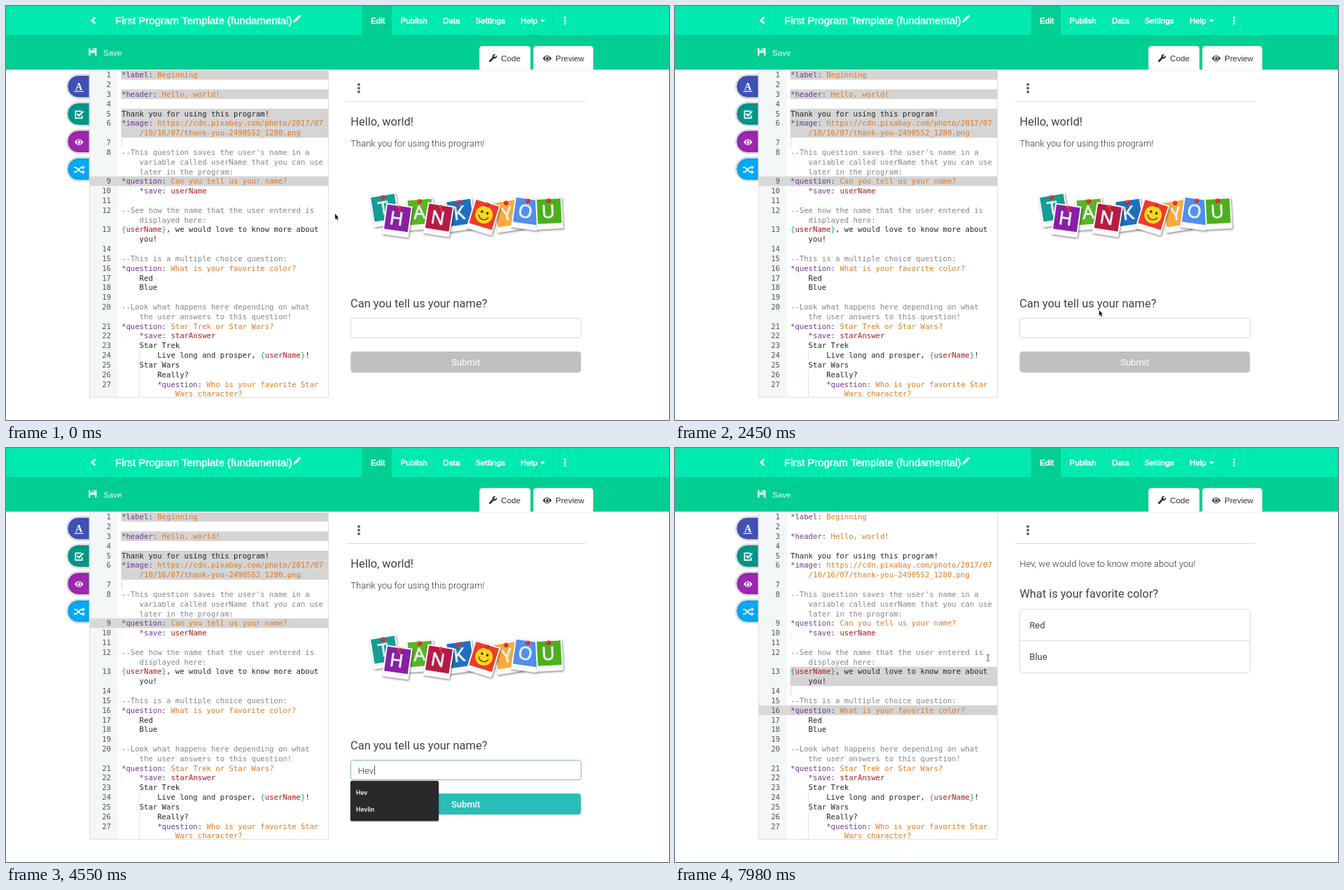
Animation of 947x592 px, one loop 8000 ms. Source, as an HTML page with a canvas:

```html
<!DOCTYPE html>
<html lang="en">
<head>
<meta charset="utf-8">
<title>Program editor</title>
<style>
html, body { margin: 0; width: 100%; height: 100%; overflow: hidden; background: #fff; }
canvas { display: block; }
</style>
</head>
<body>
<canvas id="stage" width="947" height="592"></canvas>
<script>
const ctx = document.getElementById('stage').getContext('2d');
const LOOP = 8000;
const SANS = '"Liberation Sans", Arial, sans-serif';
const ROBOTO = 'Roboto, sans-serif';
const MONO = '10.63px "DejaVu Sans Mono", monospace';
const CHAR = 6.4, ROW = 13.82, TOP = 91.6;
const USER = 'Hev', USER_LONG = 'Hevlin';

// Moments of the story in ms
const CLICK = [3060, 3300], FOCUS = 3200, KEYS = [3780, 3990, 4200];
const SENT = 5250, LOADED = 5670, BACK = 6250;
const PATH = [[0, 470, 297], [1330, 470, 297], [1610, 513, 305], [2000, 575, 362],
  [2600, 616, 459], [BACK, 616, 459], [6790, 522, 408], [7450, 447, 300], [LOOP, 447, 300]];

// Line number (0 for a wrapped row), indent, text
const CODE = [
  [1, 0, '*label: Beginning'], [2, 0, ''], [3, 0, '*header: Hello, world!'], [4, 0, ''],
  [5, 0, 'Thank you for using this program!'],
  [6, 0, '*image: https://cdn.pixabay.com/photo/2017/07'],
  [0, 4, '/10/16/07/thank-you-2490552_1280.png'], [7, 0, ''],
  [8, 0, "--This question saves the user's name in a"],
  [0, 4, 'variable called userName that you can use'], [0, 4, 'later in the program:'],
  [9, 0, '*question: Can you tell us your name?'], [10, 4, '*save: userName'], [11, 0, ''],
  [12, 0, '--See how the name that the user entered is'], [0, 4, 'displayed here:'],
  [13, 0, '{userName}, we would love to know more about'], [0, 4, 'you!'], [14, 0, ''],
  [15, 0, '--This is a multiple choice question:'],
  [16, 0, '*question: What is your favorite color?'], [17, 4, 'Red'], [18, 4, 'Blue'], [19, 0, ''],
  [20, 0, '--Look what happens here depending on what'],
  [0, 4, 'the user answers to this question!'],
  [21, 0, '*question: Star Trek or Star Wars?'], [22, 4, '*save: starAnswer'],
  [23, 4, 'Star Trek'], [24, 8, 'Live long and prosper, {userName}!'],
  [25, 4, 'Star Wars'], [26, 8, 'Really?'],
  [27, 8, '*question: Who is your favorite Star'], [0, 12, 'Wars character?']
];
const INK = { plain: '#262626', note: '#858585', key: '#6c3a8e', value: '#e07a1f', name: '#ad1a1a', brace: '#259a85' };

// Letter, centre, tilt in degrees, colour; listed from back to front
const CARDS = [
  ['T', 541, 291, -9, '#159c95'], ['A', 592, 297, -4, '#58b524'], ['K', 649, 298, -8, '#1f6fc0'],
  ['Y', 717, 299, -9, '#fbab3c'], ['O', 743, 296, 8, '#4f8ff0'], ['H', 559, 306, 8, '#8a1fa6'],
  ['N', 618, 305, 9, '#b81a46'], ['', 682, 301, 17, '#ee3b2e'], ['U', 776, 296, -3, '#4bb01c']
];

function rect(x, y, w, h, fill) { ctx.fillStyle = fill; ctx.fillRect(x, y, w, h); }

function box(x, y, w, h, r, fill, edge) {
  ctx.beginPath();
  ctx.roundRect(x, y, w, h, r);
  if (fill) { ctx.fillStyle = fill; ctx.fill(); }
  if (edge) { ctx.strokeStyle = edge; ctx.lineWidth = 1; ctx.stroke(); }
}

function disc(x, y, r, fill) {
  ctx.beginPath();
  ctx.arc(x, y, r, 0, 7);
  ctx.fillStyle = fill;
  ctx.fill();
}

function line(points, color, width) {
  ctx.beginPath();
  for (const [x, y] of points) ctx.lineTo(x, y);
  ctx.strokeStyle = color;
  ctx.lineWidth = width;
  ctx.stroke();
}

function shape(points, fill) {
  ctx.beginPath();
  for (const [x, y] of points) ctx.lineTo(x, y);
  ctx.closePath();
  ctx.fillStyle = fill;
  ctx.fill();
}

function text(s, x, y, font, fill, bolder = 0, align = 'left') {
  ctx.font = font;
  ctx.textAlign = align;
  ctx.fillStyle = fill;
  ctx.fillText(s, x, y);
  if (bolder) {
    ctx.strokeStyle = fill;
    ctx.lineWidth = bolder;
    ctx.strokeText(s, x, y);
  }
}

function at(x, y, degrees, draw) {
  ctx.save();
  ctx.translate(x, y);
  ctx.rotate(degrees * Math.PI / 180);
  draw();
  ctx.restore();
}

function dots(x, y, gap, r, fill) {
  for (const k of [-1, 0, 1]) disc(x, y + k * gap, r, fill);
}

function eye(x, y, fill, back) {
  ctx.beginPath();
  ctx.moveTo(x - 6.3, y);
  ctx.quadraticCurveTo(x, y - 8.4, x + 6.3, y);
  ctx.quadraticCurveTo(x, y + 8.4, x - 6.3, y);
  ctx.fillStyle = fill;
  ctx.fill();
  disc(x, y, 3.2, back);
  disc(x, y, 2.2, fill);
  disc(x - 0.8, y - 0.9, 0.8, back);
}

function drawHeader() {
  rect(0, 0, 947, 42, '#00eaaf');
  rect(0, 41.5, 947, 49.5, '#00ce92');
  rect(508.5, 0, 42.5, 42, '#00ce92');
  rect(143, 0, 1, 41, '#00dda3');
  rect(780, 0, 1, 41, '#00dda3');
  line([[127.3, 16.3], [122.6, 20.5], [127.3, 24.7]], '#fff', 2.5);
  text('First Program Template (fundamental)', 156, 26, '15px ' + SANS, '#fff', 0.5);
  at(415, 19, 45, () => {
    rect(-1.7, -5, 3.4, 8, '#fff');
    rect(-1.7, -7.3, 3.4, 1.6, '#fff');
    shape([[-1.7, 3.6], [1.7, 3.6], [0, 7]], '#fff');
  });
  const nav = { Edit: 521, Publish: 563.5, Data: 624, Settings: 670.5, Help: 735 };
  for (const label in nav) text(label, nav[label], 25, '11.7px ' + SANS, '#fff', 0.5);
  shape([[763, 19.5], [770, 19.5], [766.5, 23.2]], '#fff');
  dots(798.5, 20.8, 4.3, 1.6, '#fff');

  const pale = '#d4f7ea';
  box(118, 60, 11.5, 11, 1, pale);
  rect(120.5, 60, 5.5, 3.4, '#00ce92');
  rect(123.5, 60.3, 1.6, 2.4, pale);
  rect(120.5, 67.2, 6.5, 3.8, '#00ce92');
  text('Save', 139, 71, '11.6px ' + SANS, pale, 0.15);

  box(676.5, 57.5, 72.5, 34.5, [4, 4, 0, 0], '#fff', '#d5e6df');
  box(753.5, 57.5, 85, 34.5, [4, 4, 0, 0], '#fff', '#d5e6df');
  rect(677, 90, 161, 2, '#fff');
  rect(749.5, 58, 3.5, 33, '#00ce92');
  at(695.5, 74.5, 45, () => {
    box(-1.4, -2, 2.8, 9.3, 1.4, '#333');
    disc(0, -3.4, 3.2, '#333');
    rect(-1.1, -7, 2.2, 4, '#fff');
  });
  text('Code', 707, 79, '11.7px ' + SANS, '#333');
  eye(773, 75, '#333', '#fff');
  text('Preview', 785, 79, '11.5px ' + SANS, '#333');
}

function drawSideButtons() {
  ['#3f51b5', '#009688', '#9c27b0', '#03a9f4'].forEach((color, i) => {
    const y = 99.3 + i * 39.4;
    ctx.save();
    ctx.shadowColor = 'rgba(0,0,0,.35)';
    ctx.shadowBlur = 3;
    box(87.8, y, 31.2, 31.6, [15.8, 0, 0, 15.8], color, '#e4e6ea');
    ctx.restore();
  });
  const w = '#fff';
  text('A', 104, 120, 'bold 14px "Liberation Serif", serif', w, 0, 'center');
  rect(97.5, 121.5, 13, 1.2, w);

  line([[107.5, 150.3], [99.3, 150.3], [99.3, 160.3], [108.7, 160.3], [108.7, 156.5]], w, 1.7);
  line([[101.5, 154], [104.2, 156.8], [110.3, 150.5]], w, 2.2);

  eye(104.2, 194.7, w, '#9c27b0');

  line([[97, 230.8], [100, 230.8], [107, 237.4], [110, 237.4]], w, 1.7);
  line([[97, 237.4], [100, 237.4], [107, 230.8], [110, 230.8]], w, 1.7);
  for (const y of [230.8, 237.4]) shape([[109.3, y - 2.8], [113, y], [109.3, y + 2.8]], w);
}

function codeParts(s, last) {
  if (s.startsWith('--')) return [['note', s]];
  const command = s.match(/^(\*\w+:)(.*)/);
  if (command) return [['key', command[1]], [command[1] === '*save:' ? 'name' : 'value', command[2]]];
  if (last !== 'plain') return [[last, s]];
  return s.split(/([{}])/).map((part, i, all) => {
    if (part === '{' || part === '}') return ['brace', part];
    return [all[i - 1] === '{' ? 'name' : 'plain', part];
  });
}

function drawEditor(sent) {
  const marked = sent ? [13, 16] : [1, 3, 5, 6, 9];
  const active = sent ? 16 : 9;
  ctx.save();
  ctx.beginPath();
  ctx.rect(119, 92, 342, 468);
  ctx.clip();
  rect(119, 92, 342, 468, '#fff');
  rect(120, 92, 40, 467, '#f4f7f7');
  let num = 0, style = 'plain';
  CODE.forEach(([n, indent, s], i) => {
    const y = TOP + i * ROW, base = y + 10.7;
    if (n) { num = n; style = 'plain'; }
    if (marked.includes(num)) rect(164.5, y, 296, ROW, '#d4d4d4');
    if (num === active) rect(120, y, 45, ROW, '#d8d9d9');
    if (n === (sent ? 14 : 7)) rect(165, y, 1, ROW, '#dedede');
    if (n === 10 || n === 22) rect(165, y, 1, ROW, '#eeeeee');
    if (indent >= 8) rect(190, y, 1, ROW, '#e2e2e2');
    if (n) text(n, 150, base, MONO, '#555', 0, 'right');
    let x = 165 + indent * CHAR;
    for (const [kind, part] of codeParts(s, style)) {
      text(part, x, base, MONO, INK[kind]);
      x += part.length * CHAR;
      style = kind;
    }
  });
  ctx.restore();
  line([[119.5, 92], [119.5, 559.5], [460.5, 559.5], [460.5, 92]], '#dcdfdf', 1);
}

function drawCard([letter, x, y, tilt, color]) {
  at(x, y, tilt, () => {
    ctx.save();
    ctx.shadowColor = 'rgba(0,0,0,.45)';
    ctx.shadowBlur = 3;
    ctx.shadowOffsetX = 1;
    ctx.shadowOffsetY = 1.5;
    rect(-19, -22, 38, 45, '#fbfbfb');
    ctx.restore();
    rect(-17, -20, 34, 35, color);
    if (letter) {
      text(letter, -1.5, 7, '26px "Open Sans", sans-serif', '#e6f0ee', 1, 'center');
    } else {
      disc(0, -2.5, 12.5, '#ffd61f');
      disc(-4, -6, 1.8, '#4a3000');
      disc(4, -6, 1.8, '#4a3000');
      ctx.beginPath();
      ctx.arc(0, -3, 7.5, 0.3, Math.PI - 0.3);
      ctx.strokeStyle = '#5a3500';
      ctx.lineWidth = 1.4;
      ctx.stroke();
    }
    line([[0, -16], [2.2, -12]], '#aaa', 0.8);
    disc(0, -17.5, 3.2, '#d9261c');
    disc(-0.7, -18.7, 1.2, '#f4604e');
  });
}

function drawAsk(time) {
  const typed = KEYS.filter(k => time >= k).length;
  const focus = time >= FOCUS;
  text('Hello, world!', 492.3, 171, '16.4px ' + ROBOTO, '#424242');
  text('Thank you for using this program!', 492.3, 200.7, '300 13px ' + ROBOTO, '#333');
  CARDS.forEach(drawCard);
  text('Can you tell us your name?', 492, 431, '16.45px ' + ROBOTO, '#424242');
  box(492.5, 446.5, 329, 28, 3, '#fff', focus ? '#86b6b6' : '#d6d6d6');
  const field = '300 13.3px ' + ROBOTO;
  text(USER.slice(0, typed), 502.5, 465.5, field, '#333');
  if (focus) rect(503.5 + ctx.measureText(USER.slice(0, typed)).width, 454, 1, 14, '#555');
  box(492.3, 494, 329, 30.2, 4.5, typed ? '#2abdb8' : '#c0c0c0');
  text('Submit', 656.7, 514, (typed ? '500' : '400') + ' 13px ' + ROBOTO, '#fff', 0, 'center');
  if (typed) {
    ctx.save();
    ctx.shadowColor = 'rgba(0,0,0,.35)';
    ctx.shadowBlur = 3;
    box(492, 476, 126, 57.5, 2, '#29292b');
    ctx.restore();
    text(USER, 500, 496, '600 8.6px Inter, sans-serif', '#fff');
    text(USER_LONG, 500, 520, '600 8.6px Inter, sans-serif', '#fff');
  }
}

function drawAnswer() {
  text(USER + ', we would love to know more about you!', 492.3, 169.8, '300 13px ' + ROBOTO, '#333');
  text('What is your favorite color?', 492.3, 214, '16.4px ' + ROBOTO, '#424242');
  box(492.5, 230.5, 329, 91, 5, '#fff', '#d9d9d9');
  rect(493, 275, 328, 1, '#dedede');
  text('Red', 506.3, 257.5, '13px ' + ROBOTO, '#424242');
  text('Blue', 506.3, 302.7, '13px ' + ROBOTO, '#424242');
}

function pointerAt(time) {
  const i = PATH.findIndex(p => p[0] > time);
  const [t0, x0, y0] = PATH[i - 1], [t1, x1, y1] = PATH[i];
  const k = (time - t0) / (t1 - t0);
  return [x0 + (x1 - x0) * k, y0 + (y1 - y0) * k];
}

function drawPointer(time) {
  if (time >= KEYS[0] && time < BACK) return;
  const [x, y] = pointerAt(time);
  if (time >= CLICK[0] && time < CLICK[1]) {
    disc(x, y, 11.5, '#fff');
    ctx.strokeStyle = '#e0e0e0';
    ctx.lineWidth = 1;
    ctx.stroke();
  }
  const overField = time < SENT && y > 446 && y < 475 && x > 492;
  at(x, y, 0, () => {
    if (x < 460 || overField) {
      line([[0, -4], [0, 4]], '#555', 1);
      for (const s of [-1, 1]) line([[-2.3, s * 4.8], [0, s * 4], [2.3, s * 4.8]], '#555', 0.9);
      return;
    }
    const arrow = [[0, 0], [0, 8], [1.7, 6.4], [3, 9.4], [4.3, 8.8], [3, 5.9], [5.3, 5.7]];
    line([...arrow, [0, 0]], '#fff', 1.4);
    shape(arrow, '#1a1a1a');
  });
}

function draw(time) {
  const sent = time >= SENT;
  rect(0, 0, 947, 592, '#fff');
  drawHeader();
  drawSideButtons();
  drawEditor(sent);
  dots(504, 117.5, 5.2, 2, '#666');
  rect(486, 136, 342, 1, '#dcdcdc');
  if (!sent) drawAsk(time);
  else if (time >= LOADED) drawAnswer();
  drawPointer(time);
}

const start = performance.now();
function tick() {
  draw((performance.now() - start) % LOOP);
  requestAnimationFrame(tick);
}
tick();
</script>
</body>
</html>
```
